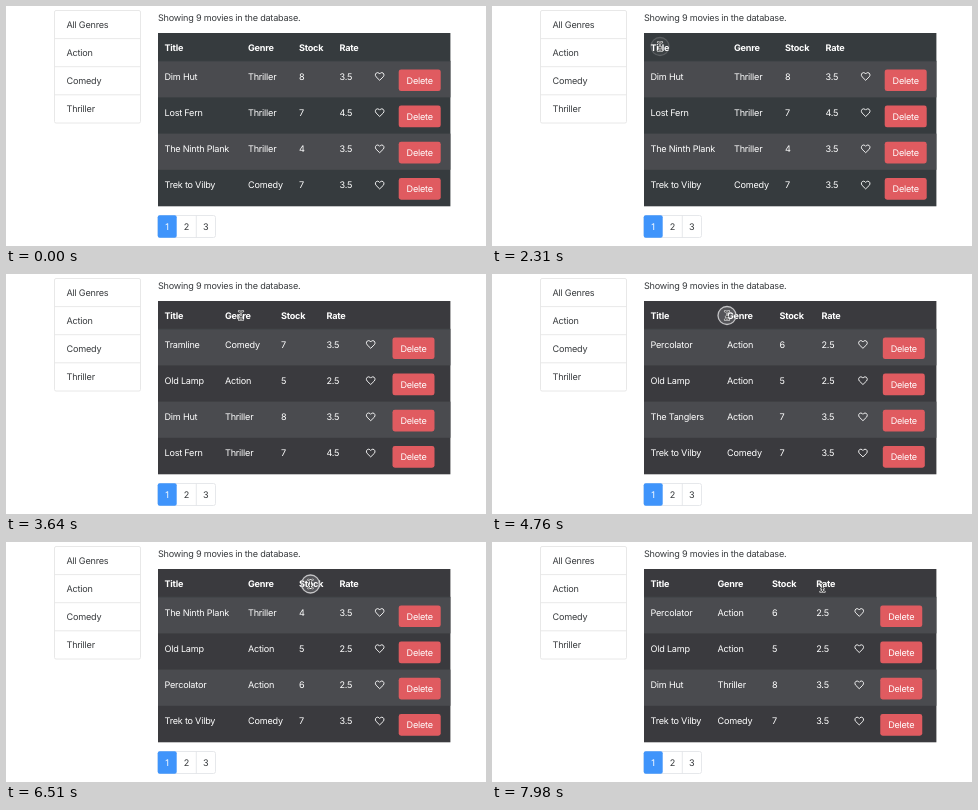
Write an HTML page that moves like this. It is 480 by 240 pixels and loops after 8000 ms.

```html
<!DOCTYPE html>
<html lang="en">
<head>
<meta charset="utf-8">
<title>Sortable movie table</title>
<style>
  html, body { margin: 0; width: 100%; height: 100%; overflow: hidden; background: #fff; }
  svg { display: block; width: 480px; height: 240px; }
  text {
    font: 9.1px Inter, Roboto, sans-serif;
    letter-spacing: -.22px;
    fill: #383b3e;
    text-rendering: geometricPrecision;
  }
  .light text, text.light { fill: #fff; }
  .head text { font-weight: 700; }
  .middle { text-anchor: middle; }
</style>
</head>
<body>
<svg id="stage" viewBox="0 0 480 240"></svg>
<script>
const LOOP = 8000, STEP = 70, ROW = 36.2, TABLE_X = 152, TITLE_X = 158.5;
const stage = document.getElementById('stage');

function add(parent, tag, attrs = {}, content = '') {
  const node = document.createElementNS('http://www.w3.org/2000/svg', tag);
  for (const key in attrs) node.setAttribute(key, attrs[key]);
  node.textContent = content;
  return parent.appendChild(node);
}
const rect = (parent, x, y, width, height, fill, more = {}) =>
  add(parent, 'rect', { x, y, width, height, fill, ...more });
const label = (parent, x, y, content, cls = '') =>
  add(parent, 'text', { x, y, class: cls }, content);

const movies = {
  percolator: ['Percolator', 'Action', 6, '2.5'],
  lamp: ['Old Lamp', 'Action', 5, '2.5'],
  hut: ['Dim Hut', 'Thriller', 8, '3.5'],
  trek: ['Trek to Vilby', 'Comedy', 7, '3.5'],
  tramline: ['Tramline', 'Comedy', 7, '3.5'],
  picnic: ['Picnic Gatherers', 'Comedy', 7, '3.5'],
  fern: ['Lost Fern', 'Thriller', 7, '4.5'],
  plank: ['The Ninth Plank', 'Thriller', 4, '3.5'],
  tanglers: ['The Tanglers', 'Action', 7, '3.5']
};

// spread: how far the widest title pushes the genre column to the right
const views = [
  { at: 0, spread: 23, rows: 'hut fern plank trek' },
  { at: 2380, spread: 0, rows: 'tramline lamp hut fern' },
  { at: 4130, spread: 16, rows: 'percolator lamp tanglers trek' },
  { at: 4900, spread: 23, rows: 'hut fern plank trek' },
  { at: 5950, spread: 23, rows: 'plank lamp percolator trek' },
  { at: 6580, spread: 36, rows: 'hut trek tramline picnic' },
  { at: 7420, spread: 6.5, rows: 'percolator lamp hut trek' }
];

const clicks = [
  { on: 2170, fade: 2310, off: 2380 },
  { on: 4060, fade: 4130, off: 4200 },
  { on: 4620, fade: 4900, off: 4900 },
  { on: 5880, fade: 5950, off: 6020 },
  { on: 6510, fade: 6580, off: 6650 },
  { on: 7350, fade: 7420, off: 7490 }
];

// time, x, y
const path = [
  [70, 186, 14], [770, 157.5, 42], [910, 157.5, 42], [1050, 174, 43], [1400, 174, 43],
  [1610, 171, 42], [1890, 171, 42], [1960, 168, 40.5], [2590, 168, 40.5],
  [2940, 202, 41], [3430, 250, 44], [3640, 235, 41.5], [5110, 235, 41.5],
  [5600, 308, 45], [5740, 304.5, 42], [6720, 304.5, 42],
  [7210, 342, 44], [7350, 338, 41], [7770, 338, 41], [7980, 330.5, 45.5]
];

function columnsFor(spread) {
  return {
    cells: [TITLE_X, 219 + spread, 275 + .78 * spread, 320.5 + .565 * spread],
    heart: 360 + .39 * spread,
    button: 386.5 + .27 * spread
  };
}

function drawSidebar() {
  rect(stage, 48.5, 4.5, 86, 112.5, '#fff', { stroke: '#e2e2e2', 'stroke-width': .8, rx: 1.5 });
  ['All Genres', 'Action', 'Comedy', 'Thriller'].forEach((name, i) => {
    const y = 4.5 + 28.1 * i;
    if (i) add(stage, 'path', { d: `M48.5 ${y}h86`, stroke: '#e2e2e2', 'stroke-width': .8 });
    label(stage, 60.5, y + 17.6, name);
  });
}

function drawPagination() {
  rect(stage, 152, 209.5, 57.5, 22, '#fff', { stroke: '#e0e3e6', 'stroke-width': .8, rx: 2 });
  add(stage, 'path', { d: 'M190.3 209.5v22', stroke: '#e0e3e6', 'stroke-width': .8 });
  rect(stage, 151.7, 209.2, 19, 22.6, '#3f94fb', { rx: 2 });
  [161, 180.3, 199.8].forEach((x, i) => label(stage, x, 223.9, i + 1, i ? 'middle' : 'middle light'));
}

drawSidebar();
label(stage, TABLE_X, 14.5, 'Showing 9 movies in the database.');
const base = rect(stage, TABLE_X, 27, 292.4, 173.3, '#363b3e');
for (const i of [0, 2]) rect(stage, TABLE_X, 55.2 + ROW * i, 292.4, ROW, '#4a4b4f');
add(stage, 'path', { d: 'M152 55.2h292.4', stroke: '#434649', 'stroke-width': .7 });

const head = add(stage, 'g', { class: 'head light' });
const headers = ['Title', 'Genre', 'Stock', 'Rate'].map(name => label(head, TITLE_X, 45, name));

const rows = [0, 1, 2, 3].map(i => {
  const g = add(stage, 'g', { class: 'light', transform: `translate(0 ${ROW * i})` });
  const cells = [0, 1, 2, 3].map(() => label(g, 0, 73.8, ''));
  const heart = add(g, 'path', {
    d: 'M4.7 8.3L1.1 4.8C-.3 3.2 .5 .6 2.6 .6C3.7 .6 4.3 1.3 4.7 1.9C5.1 1.3 5.7 .6 6.8 .6C8.9 .6 9.7 3.2 8.3 4.8Z',
    fill: 'none', stroke: '#fff', 'stroke-width': .9, 'stroke-linejoin': 'round'
  });
  const button = add(g, 'g');
  rect(button, 0, 63.4, 42, 21.7, '#e05b60', { rx: 2.4 });
  label(button, 21, 77.6, 'Delete', 'middle');
  return { cells, heart, button };
});
drawPagination();

const ring = add(stage, 'circle', {
  r: 9, fill: '#fff', 'fill-opacity': .14, stroke: '#c4c4c6', 'stroke-width': 1.3
});
const arrow = add(stage, 'path', {
  d: 'M0 0V8.4L1.9 6.7L3.2 9.6L4.7 8.9L3.4 6.1H6Z',
  fill: '#111', stroke: '#fff', 'stroke-width': .8, 'stroke-linejoin': 'round'
});
const beam = add(stage, 'g', { fill: 'none', 'stroke-linecap': 'round' });
for (const [stroke, width] of [['#fff', 1.9], ['#222', .8]]) {
  add(beam, 'path', {
    d: 'M-2.2 -4.3Q0 -4.3 0 -3Q0 -4.3 2.2 -4.3M0 -3V3M-2.2 4.3Q0 4.3 0 3Q0 4.3 2.2 4.3M-1.2 1.2H1.2',
    stroke, 'stroke-width': width
  });
}

function pointerAt(t) {
  const next = path.findIndex(p => p[0] > t);
  if (next < 0) return path[path.length - 1].slice(1);
  if (next === 0) return path[0].slice(1);
  const [t0, x0, y0] = path[next - 1], [t1, x1, y1] = path[next];
  const u = (t - t0) / (t1 - t0), k = u * u * (3 - 2 * u);
  return [x0 + (x1 - x0) * k, y0 + (y1 - y0) * k];
}

let shown = null;
function showView(view) {
  if (view === shown) return;
  shown = view;
  const { cells, heart, button } = columnsFor(view.spread);
  base.setAttribute('fill', view.at ? '#3a3a3e' : '#363b3e');
  headers.forEach((node, c) => node.setAttribute('x', cells[c]));
  view.rows.split(' ').forEach((key, i) => {
    const row = rows[i];
    row.cells.forEach((node, c) => {
      node.setAttribute('x', cells[c]);
      node.textContent = movies[key][c];
    });
    row.heart.setAttribute('transform', `translate(${heart} 66)`);
    row.button.setAttribute('transform', `translate(${button} 0)`);
  });
}

function showPointer(t) {
  const [x, y] = pointerAt(t);
  const starts = columnsFor(shown.spread).cells, widths = [20, 27, 26, 20];
  const overText = y > 36 && y < 49 &&
    starts.some((start, c) => x > start - .6 && x < start + widths[c]);
  const place = `translate(${x} ${y})`;
  arrow.setAttribute('transform', place);
  beam.setAttribute('transform', place);
  arrow.setAttribute('opacity', t >= STEP && !overText ? 1 : 0);
  beam.setAttribute('opacity', t >= STEP && overText ? 1 : 0);

  const click = clicks.find(c => t >= c.on && t < c.off);
  ring.setAttribute('transform', place);
  ring.setAttribute('opacity', !click ? 0 : t < click.fade ? 1 : .25);
}

function render(time) {
  const t = Math.floor(time % LOOP / STEP) * STEP;
  showView(views.filter(v => v.at <= t).pop());
  showPointer(t);
}

const start = performance.now();
function tick() {
  render(performance.now() - start);
  requestAnimationFrame(tick);
}
tick();
</script>
</body>
</html>
```
